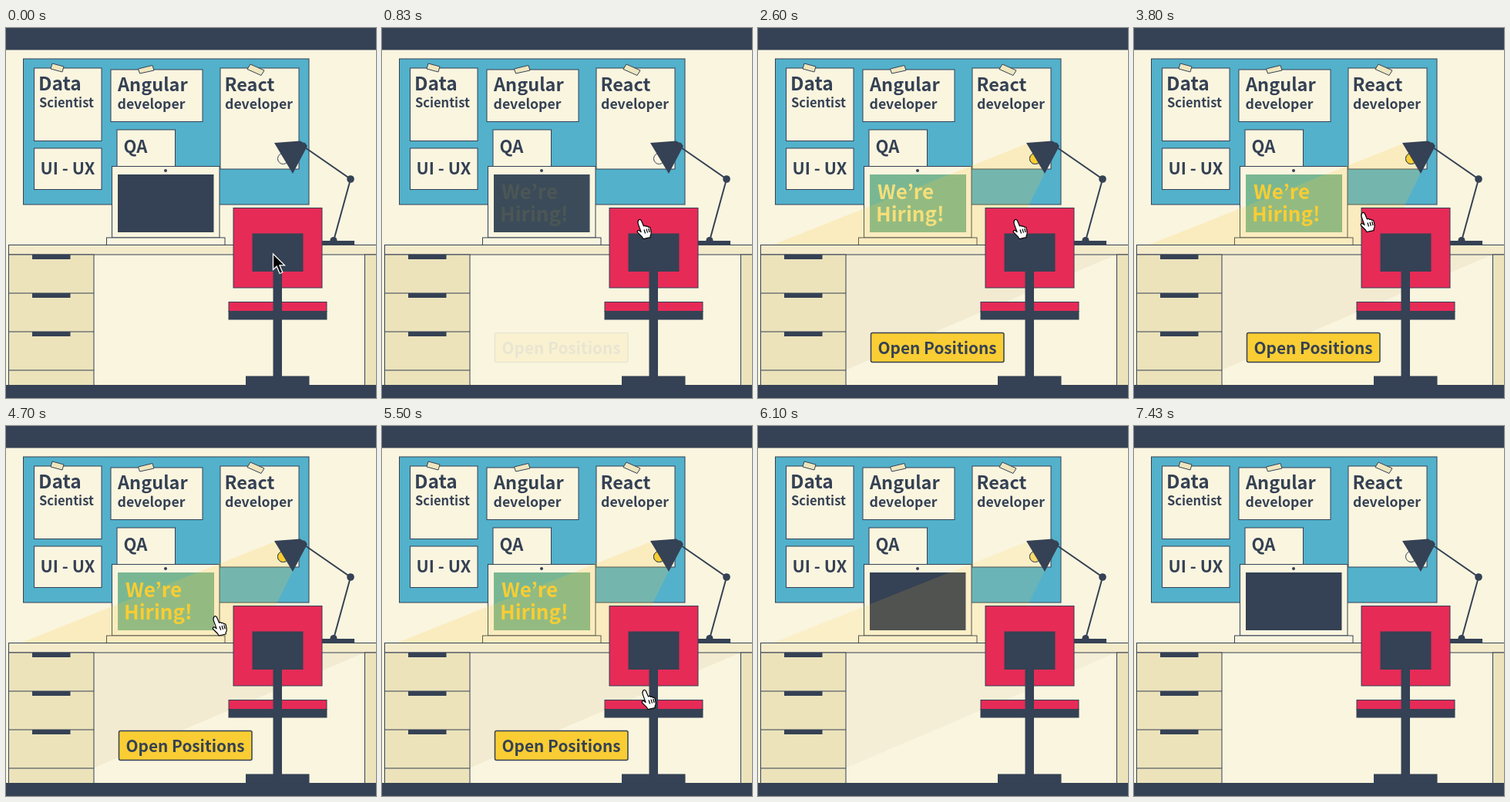
An HTML page for the animation above (7.77 s loop, 480x480 px).

```html
<!DOCTYPE html>
<html lang="en">
<head>
<meta charset="utf-8">
<title>Open positions</title>
<style>
  html, body { margin: 0; width: 100%; height: 100%; overflow: hidden; background: #faf5df; }
  svg { display: block; width: 100%; height: 100%; }
  text {
    font-family: "Noto Sans CJK JP", "Noto Sans CJK SC", "Noto Sans CJK", "Open Sans", sans-serif;
    font-weight: 700;
    fill: #354154;
  }
  .line { stroke: #354154; stroke-width: 1; }
  .navy { fill: #354154; }
  .cream { fill: #faf5df; }
  .wood { fill: #ece3bb; }
  .red { fill: #e62b57; }
</style>
</head>
<body>
<svg viewBox="0 0 480 480">
  <rect class="cream" width="480" height="480"/>
  <rect class="navy" width="480" height="28.5"/>

  <!-- Board with notes -->
  <g class="line cream">
    <rect x="22.5" y="40" width="370.5" height="189" fill="#53b1cb"/>
    <rect x="36.5" y="52" width="87.5" height="94.5"/>
    <rect x="36.5" y="156" width="87.5" height="53.5"/>
    <rect x="136" y="54" width="119" height="67.5"/>
    <rect x="144" y="132" width="75.5" height="50"/>
    <rect x="278" y="52" width="102" height="131"/>
    <g fill="#efe6bf">
      <path d="M60 46l15 4-2 7-15-4z"/>
      <path d="M171.500 53l18.500-4.500 2 6.500-18.500 4z"/>
      <path d="M317 47l18 8-4 6.500-18-8z"/>
    </g>
  </g>
  <text x="42" y="80.500" font-size="24.500">Data</text>
  <text x="43" y="102.500" font-size="16.500">Scientist</text>
  <text x="145" y="82" font-size="23.500">Angular</text>
  <text x="144.500" y="104.500" font-size="17.700">developer</text>
  <text x="283.500" y="82" font-size="23.500">React</text>
  <text x="284" y="104.500" font-size="17.700">developer</text>
  <text x="44.500" y="190" font-size="21.700">UI - UX</text>
  <text x="152.500" y="162" font-size="22">QA</text>

  <!-- Laptop -->
  <g class="line cream">
    <rect x="137.500" y="179.500" width="139.500" height="92.500"/>
    <rect x="130.500" y="272" width="153.500" height="9.500"/>
  </g>
  <circle class="navy" cx="207" cy="185" r="2"/>
  <rect class="navy" x="145" y="190" width="124.500" height="75"/>
  <rect id="glow" x="145" y="190" width="124.500" height="75" fill="#79b793"/>

  <!-- Desk -->
  <path id="shade" d="M114 294H465L114 443.500z" fill="#d9c9a8"/>
  <g class="line wood">
    <rect x="3.500" y="281.500" width="480" height="12.500" fill="#f4ebcb"/>
    <rect x="3.500" y="294" width="110.500" height="170"/>
    <rect x="465.500" y="294" width="20" height="170"/>
    <path d="M3.500 344H114M3.500 394H114M3.500 444H114"/>
  </g>
  <path class="navy" d="M34 294h49.500v6H34zM34 344h49.500v6H34zM34 394h49.500v6H34z"/>
  <rect class="navy" y="463" width="480" height="17"/>

  <!-- Lamp -->
  <path id="beam" d="M349 150L372 188 350 233 326 281H20z" fill="#fbc93a"/>
  <g id="hiring" font-size="26">
    <text x="155" y="221.500">We’re</text>
    <text x="153" y="251">Hiring!</text>
  </g>
  <circle class="line cream" cx="359.500" cy="169.500" r="7"/>
  <circle id="bulb" class="line" cx="359.500" cy="169.500" r="7" fill="#f9cd33"/>
  <path class="navy" d="M348 149L382 146.500 391 153 372 189z"/>
  <path d="M385 153L447 196 425 276" fill="none" stroke="#354154" stroke-width="2"/>
  <g class="navy">
    <circle cx="385.500" cy="153" r="4.500"/>
    <circle cx="447" cy="196" r="4.800"/>
    <circle cx="425" cy="275.500" r="4.500"/>
    <rect x="408" y="276" width="44" height="6"/>
  </g>

  <!-- Chair -->
  <g class="line red">
    <rect x="295" y="233.500" width="115" height="103.500"/>
    <rect x="289" y="355.500" width="127" height="12"/>
  </g>
  <path class="navy" d="M319.500 266.500h66V316H358V367h58.500v11.500H358V451.500h35.500V463.500h-82.500V451.500h35.500V378.500H288.500V367H346.500V316H319.500z"/>

  <g id="button">
    <rect x="146.500" y="395.500" width="172.500" height="38" rx="2" fill="#f9cd33" stroke="#354154" stroke-width="1.500"/>
    <text x="155.500" y="422.500" font-size="20.800">Open Positions</text>
  </g>

  <path id="arrow" d="M0 0V20.500L4.700 16.200 8.600 25.500 12.300 24 8.400 14.800H15z"
        fill="#000" stroke="#fff" stroke-width="1.300"/>
  <path id="hand" d="M4 1q2-1.500 3.500 1l3 7q2-1.500 3 .5 2-1 3 1 2-.8 2.600 1.200l1 5q.5 3-1 5v2l-9 2-1.500-2.500-6-6q-1-2 1-2.600 1.500-.3 3.500 2l-4-11q-.5-3 .9-4.600zM11 13.500l1.600 5M14 12.700l1.500 5M16.800 12l1.300 5"
        fill="#fff" stroke="#000" stroke-width="1.200" stroke-linejoin="round"/>
</svg>
<script>
  const LOOP = 7770;
  const HAND_START = 230;
  const $ = id => document.getElementById(id);

  // Cursor stops: time, x, y
  const arrowPath = [[0, 346.5, 293], [30, 346.5, 293], [230, 333, 249]];
  const handPath = [
    [230, 329, 248], [3330, 329, 248], [3800, 292, 239], [3900, 286, 240],
    [4530, 286, 240], [4830, 251, 251], [5099, 251, 251], [5100, 335, 342],
    [5530, 335, 342], [5800, 350, 482]
  ];

  const mix = (a, b, k) => a + (b - a) * k;
  const ramp = (t, from, to) => {
    const k = Math.min(1, Math.max(0, (t - from) / (to - from)));
    return k * k * (3 - 2 * k);
  };

  function pointAt(path, t) {
    const next = path.findIndex(stop => stop[0] > t);
    if (next < 0) return path[path.length - 1].slice(1);
    if (next === 0) return path[0].slice(1);
    const [t0, x0, y0] = path[next - 1];
    const [t1, x1, y1] = path[next];
    const k = (t - t0) / (t1 - t0);
    return [mix(x0, x1, k), mix(y0, y1, k)];
  }

  function place(id, path, t, visible) {
    $(id).setAttribute("transform", `translate(${pointAt(path, t)})`);
    $(id).style.display = visible ? "" : "none";
  }

  function draw(t) {
    const screen = ramp(t, 790, 1020) * (1 - ramp(t, 5530, 5950));
    const light = ramp(t, 980, 2300) * (1 - ramp(t, 5600, 6900));
    for (const id of ["glow", "hiring", "button"]) $(id).style.opacity = screen;
    $("beam").style.opacity = light * 0.2;
    $("shade").style.opacity = light * 0.25;
    $("bulb").style.opacity = light;

    const pale = t < 2815 ? light : 0;
    const color = `rgb(${mix(249, 246, pale)},${mix(205, 223, pale)},${mix(51, 122, pale)})`;
    for (const line of $("hiring").children) line.style.fill = color;

    place("arrow", arrowPath, t, t < HAND_START);
    place("hand", handPath, t, t >= HAND_START && t < 5800);
  }

  const start = performance.now();
  function frame() {
    draw((performance.now() - start) % LOOP);
    requestAnimationFrame(frame);
  }
  frame();
</script>
</body>
</html>
```
